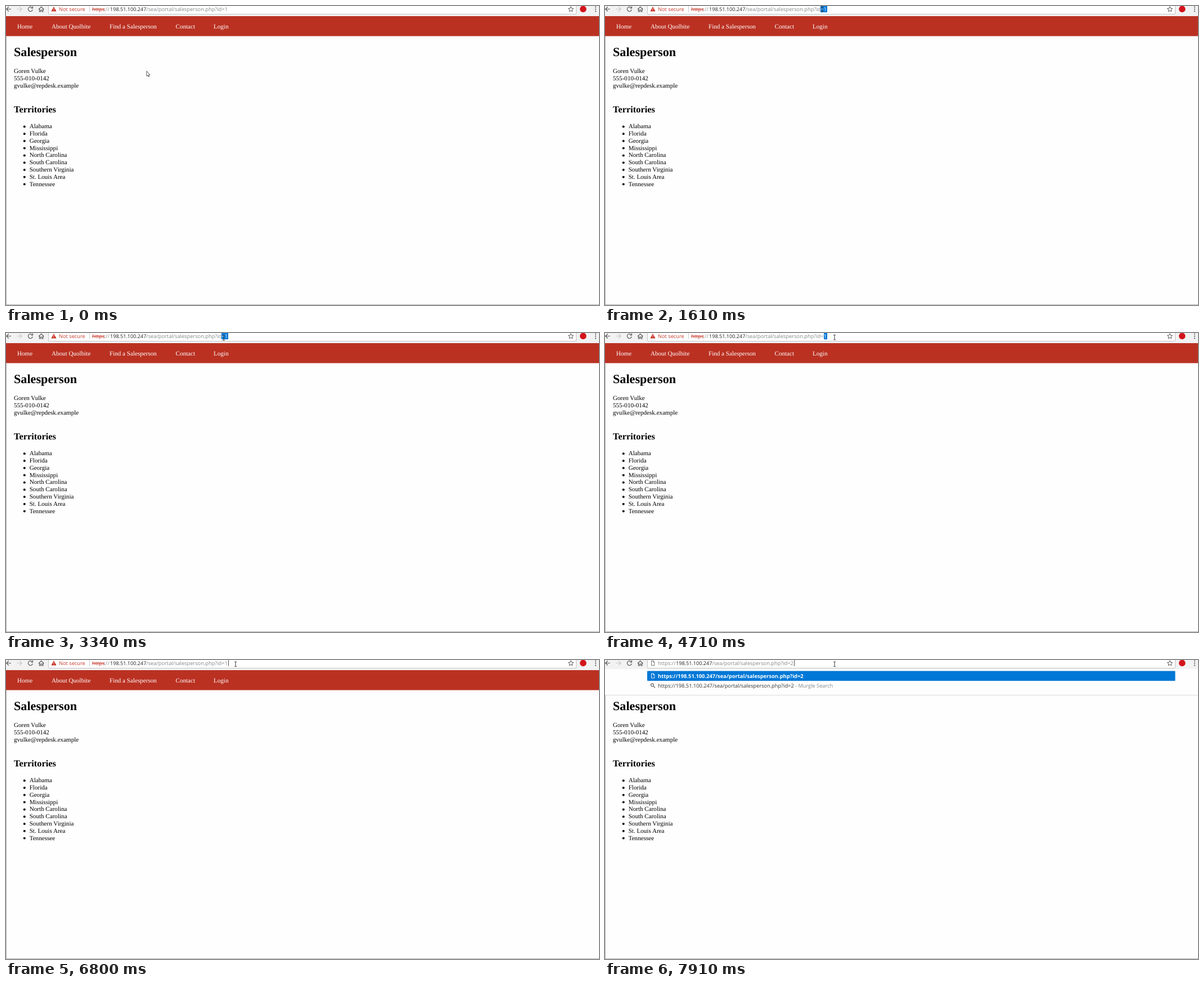
An HTML page for the animation above (8000 ms loop, 1054 by 531 pixels).

```html
<!DOCTYPE html>
<html lang="en">
<head>
<meta charset="utf-8">
<title>Salesperson</title>
<style>
  html, body { margin: 0; width: 100%; height: 100%; overflow: hidden; background: #fefefe; }
  svg { display: block; }
  text { text-rendering: geometricPrecision; white-space: pre; }
  .page { font: 11.1px "Liberation Serif", serif; }
  .page .h1 { font-size: 22.2px; font-weight: bold; }
  .page .h2 { font-size: 16.4px; font-weight: bold; }
  .ui { font: 9.25px "Open Sans", "Noto Sans", sans-serif; fill: #333; }
  .host { font-size: 9.1px; fill: #222; }
  .dim { fill: #85878a; }
  .match { font-weight: bold; font-size: 9.4px; fill: #145ccd; }
  .blue { fill: #145ccd; }
  .white, .white tspan { fill: #fff; }
  .line { fill: none; stroke: #5a5a5a; stroke-width: 1.2; }
</style>
</head>
<body>
<svg width="1054" height="531" viewBox="0 0 1054 531">
  <defs>
    <clipPath id="selClip"><rect id="selBox" y="0" height="11.5"/></clipPath>
    <path id="doc" class="line" d="M-2.5 -4h3.3l2 2v6h-5.3zM.6 -4v2.2h2.2" style="stroke-width:.9;stroke:inherit"/>
    <g id="lens" class="line"><circle cx="-1" cy="-1" r="2.5"/><path d="M1 1l3 3"/></g>
  </defs>

  <g id="page" class="page"></g>

  <g id="toolbar">
    <rect width="1054" height="18" fill="#f2f2f2"/>
    <rect x="75.5" y="-4" width="938" height="18.5" rx="1.5" fill="#fff" stroke="#c3c3c3"/>
    <path class="line" d="M9 5.5H1M4.800 1.500L.8 5.500l4 4"/>
    <path class="line" d="M19.500 5.500h8.500M24.200 1.500l4 4-4 4" style="stroke:#c9c9c9"/>
    <path class="line" d="M46.500 3a4 4 0 1 0 .8 3.500M47.500 .8v3.200h-3.200"/>
    <path class="line" d="M58 6l4.700-4.500L67.400 6M59.500 5v5h2v-3h2.400v3h2V5"/>
    <path class="line" d="M1004 1l1.300 3.100 3.400.3-2.600 2.200.8 3.300-2.900-1.800-2.900 1.800.8-3.300-2.600-2.200 3.400-.3z" style="stroke-width:1"/>
    <circle cx="1025.800" cy="5.500" r="5.800" fill="#d3131b"/>
    <g fill="#5a5a5a"><circle cx="1048" cy="1.800" r="1.100"/><circle cx="1048" cy="5.600" r="1.100"/><circle cx="1048" cy="9.400" r="1.100"/></g>
  </g>

  <g id="address" class="ui"></g>
  <g id="menu5" class="ui"></g>
  <g id="menu2" class="ui"></g>

  <rect id="caret" width="1" height="11" fill="#555"/>
  <path id="arrow" d="M.5 .5v9.200l2-1.800 1.400 3 1.300-.6-1.400-2.900h2.600z" fill="#fff" stroke="#444" stroke-width=".9"/>
  <path id="beam" d="M-2 .5h1.500l.5 .5.5-.5h1.500M0 1v7.500M-2 9h1.500l.5-.5.5 .5h1.500" fill="none" stroke="#333" stroke-width="1"/>
</svg>

<script>
const $ = id => document.getElementById(id);
const host = "198.51.100.247";
const path = "/sea/portal/salesperson.php?id=";
const base = "https://" + host + path;
const person = "Goren Vulke";

const text = (x, y, body, cls = "") => `<text x="${x}" y="${y}" class="${cls}">${body}</text>`;
const icon = (id, x, y, color = "#666") => `<use href="#${id}" x="${x}" y="${y}" style="stroke:${color}"/>`;
const rect = (x, y, w, h, fill) => `<rect x="${x}" y="${y}" width="${w}" height="${h}" fill="${fill}"/>`;

// Web page
const nav = [[20, "Home"], [81, "About Quolbite"], [184, "Find a Salesperson"], [301.5, "Contact"], [369, "Login"]];
const places = ["Alabama", "Florida", "Georgia", "Mississippi", "North Carolina", "South Carolina",
  "Southern Virginia", "St. Louis Area", "Tennessee"];
$("page").innerHTML =
  rect(0, 18, 1054, 35.5, "#ba3122") +
  nav.map(([x, label]) => text(x, 40.3, label, "white")).join("") +
  text(14, 89, "Salesperson", "h1") +
  [person, "555-010-0142", "gvulke@repdesk.example"].map((s, i) => text(14, 119.2 + i * 12.85, s)).join("") +
  text(14, 189.3, "Territories", "h2") +
  places.map((s, i) => {
    const y = 217.2 + i * 12.8;
    return `<circle cx="32.8" cy="${y - 3}" r="2"/>` + text(41.7, y, s);
  }).join("") +
  rect(0, 53, 1, 478, "#b0b0b0") + rect(0, 530, 1054, 1, "#b0b0b0");

// Address bar
const hostAndPath = (x, id) => text(x + 32, 9, host, "host") + text(x + 96.3, 9, path + id, "dim");
$("address").innerHTML =
  `<path d="M85 1.200l4.600 8.300h-9.200z" fill="#c5281c"/>` +
  `<path d="M85 4v2.600M85 7.400v1.100" stroke="#fff"/>` +
  `<g fill="#c5392a">${text(94, 9, "Not secure")}${text(153, 9, "https")}</g>` +
  rect(153, 5.6, 22, 1, "#c5392a") + text(174.6, 9, "://", "dim") +
  rect(148, 0, 1, 11, "#ccc") + hostAndPath(153, 1) +
  `<g clip-path="url(#selClip)">${rect(360, 0, 36, 11.5, "#0078d7")}${text(249.3, 9, path + 1, "white")}</g>`;

// Suggestion lists
const rowY = i => 31.6 + i * 17.4;
const searchRow = (i, id, x) => icon("lens", 85, rowY(i) - 3.6) +
  text(94, rowY(i), base + id) + text(x, rowY(i), "- Murgle Search", "dim");
const suggestions = (id, height, rows) =>
  rect(0, 16, 1054, height - 16, "#fefefe") + rect(0, height - 1, 1054, 1, "#dcdcdc") +
  icon("doc", 85, 5.5) + text(94, 9, "https://", "dim") + hostAndPath(94, id) +
  `<rect x="75" y="19.600" width="938.500" height="17.400" rx="1" fill="#0078d7"/>` +
  icon("doc", 85, 28, "#fff") + text(94, rowY(0), base + id, "match white") + rows;
const hits = [[1, "Salesperson: " + person], [5, "Salesperson: Ven Dalker"], [0, "Find a Salesperson"]];
$("menu5").innerHTML = suggestions("", 111, hits.map(([id, title], i) => {
  const y = rowY(i + 1);
  return icon("doc", 85, y - 3.6) + text(94, y, base, "match") + text(349, y, id, "blue") +
    text(357, y, "-", "dim") + text(364, y, title);
}).join("") + searchRow(4, "", 333));
$("menu2").innerHTML = suggestions(2, 63, searchRow(1, 2, 338));

// Each step lists only what changes: pointer, selection start, caret, open list
const end = 395;
const steps = [
  { t: 0, at: [249.5, 115], arrow: true, sel: end, caret: 0, menu: "" },
  { t: 120, at: [299, 79] }, { t: 240, at: [372, 26] },
  { t: 360, at: [400, 5], arrow: false }, { t: 510, at: [402, 1] }, { t: 640, at: [400, 3] },
  { t: 790, at: [390, 3], sel: 389 }, { t: 910, at: [380, 3], sel: 383 },
  { t: 1060, at: [372, 3], sel: 375 }, { t: 1190, at: [365, 3], sel: 371 },
  { t: 1330, at: [386, 1], sel: 383 }, { t: 1480, at: [387, 1], sel: 389 }, { t: 1610, at: [386, 1], sel: 383 },
  { t: 1760, at: [399, 3], sel: end }, { t: 2040, at: [390, 3] },
  { t: 2200, at: [369, 3], sel: 371 }, { t: 2350, at: [365, 3] },
  { t: 3340, at: [387, 4], sel: 383 }, { t: 3610, at: [388, 4], sel: 389 },
  { t: 4710, at: [408, 3] }, { t: 4850, at: [410, 3] }, { t: 5130, at: [418, 2.5] },
  { t: 5540, at: [409, 2.5] }, { t: 5690, at: [408, 2.5] },
  { t: 5840, sel: end, caret: 395 }, { t: 6250, caret: 0 }, { t: 6800, caret: 395 },
  { t: 7200, caret: 331, menu: "menu5" }, { t: 7760, caret: 0 },
  { t: 7910, caret: 336, menu: "menu2" }
];
const show = (id, on) => { $(id).style.display = on ? "" : "none"; };

function draw(now) {
  const time = now % 8000;
  const state = Object.assign({}, ...steps.filter(s => s.t <= time));
  const [x, y] = state.at;
  $(state.arrow ? "arrow" : "beam").setAttribute("transform", `translate(${x} ${y})`);
  show("arrow", state.arrow);
  show("beam", !state.arrow);
  $("selBox").setAttribute("x", state.sel);
  $("selBox").setAttribute("width", end - state.sel);
  $("caret").setAttribute("x", state.caret);
  show("caret", state.caret);
  show("address", !state.menu);
  show("menu5", state.menu === "menu5");
  show("menu2", state.menu === "menu2");
}

const start = performance.now();
function tick() {
  draw(performance.now() - start);
  requestAnimationFrame(tick);
}
tick();
</script>
</body>
</html>
```
